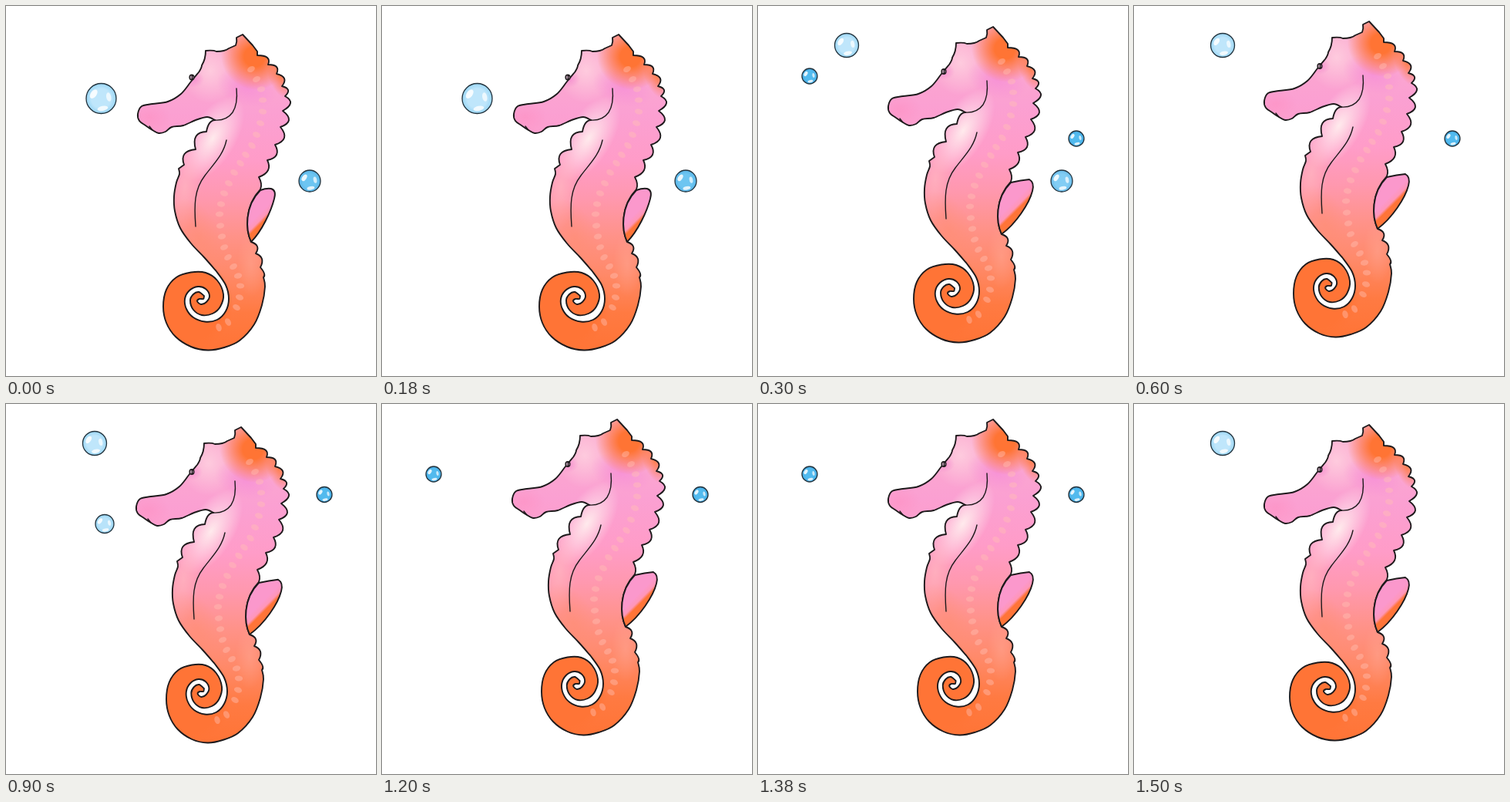
Write an HTML page with a canvas that moves like this. It is 480 px wide and 480 px high and loops after 1.8 s.

```html
<!DOCTYPE html>
<html>
<head>
<meta charset="utf-8">
<style>
  html, body { margin: 0; width: 100%; height: 100%; overflow: hidden; background: #fff; }
  canvas { display: block; }
</style>
</head>
<body>
<canvas id="stage" width="480" height="480"></canvas>
<script>
const ctx = document.getElementById('stage').getContext('2d');
const INK = '#1e1a1c', STEP = 300;

// bubbles: x, y, radius, paleness 0..1
const topLeft = [115, 51, 15.5, 0.8], sideLeft = [67, 91, 10, 0];
const sideRight = [394, 227, 14, 0.35], lowRight = [413, 172, 10, 0], highRight = [413, 117.5, 10, 0];
const rest = { dx: 0, dy: 0, curl: 0, fin: 0, eye: [241, 92.5] };
const pose = (dy, curl, fin) => ({ dx: -2, dy, curl, fin, eye: [243, 95] });
const low = pose(-10, 0, 10), high = pose(-17, 5, 10), mid = pose(-7, 6, 11);
const steps = [
  [rest, [[123.5, 120, 19.5, 0.8], [394, 227, 14, 0.2]]],
  [low, [topLeft, sideLeft, lowRight, sideRight]],
  [high, [topLeft, lowRight]],
  [mid, [topLeft, [128, 155.5, 12, 0.75], highRight]],
  [high, [sideLeft, highRight]],
  [low, [topLeft]]
];

const pairs = text => text.split(' ').map(p => p.split(',').map(Number));

// smooth line through the points, continuing from the first one
function smooth(pts) {
  let d = 'L' + pts[0];
  for (let i = 0; i < pts.length - 1; i++) {
    const a = pts[i - 1] || pts[i], b = pts[i], c = pts[i + 1], e = pts[i + 2] || c;
    d += `C${b.map((v, k) => v + (c[k] - a[k]) / 6)} ${c.map((v, k) => v - (e[k] - b[k]) / 6)} ${c}`;
  }
  return d;
}

// scallops: notch, tip, notch, tip, ... notch
function bumps(pts) {
  let d = 'L' + pts[0];
  for (let i = 0; i + 2 < pts.length; i += 2) {
    const [a, tip, b] = pts.slice(i, i + 3);
    d += `Q${tip.map((v, k) => 2 * v - (a[k] + b[k]) / 2)} ${b}`;
  }
  return d;
}

const back = pairs('326,64 339,67 340,76 351,79 351,88 361,94 358,104 366,109 362,117 369,126 359,136 367,148 356,157 361,171 349,180 351,193 339,200 340,213 328,222');
const lowerBack = pairs('318,306 326,312 324,321 332,328 330,339 335,347 334,352');
const tailOuter = pairs('334,352 336,364 332,388 322,413 303,434 283,443 262,446.5 240,442 220,429 208,411 204,390 208,368 221,352 240,345.5 259,346 274,356 282,374 278,390 268,399 254,401 243,394 239,382 243,374 250,371 257,376');
const tailInner = pairs('257,376 256,380 251,380 248,383 253,387 260,384 264,376 259,367 249,364 238,369 232,380 234,393 243,404 258,409.5 274,407 285,396 289,380 285,362 272,343');
const belly = pairs('272,343 257,326 240,308 226,288 219,266 218,247 221,229 225,218 224,211');
const front = pairs('231,206 231.5,192 246,186 246.5,169 260,163 264,152 271,148');
const snout = pairs('271,148 261,144 246,148 230,155 215,157 207,163 198,165 190,161 181,155 173,149 171,140 176,130 190,127 210,124 227,114 240,98 250,86');
const forehead = 'Q254 80 254 77Q259 69 259 58Q269 57 273 59Q284 59 289 55L298 51Q300 46 299 41L307 37L320 51L326 59Z';
const spots = pairs('318,82 325,95 331,108 333,122 333,137 330,152 325,167 319,181 311,193 304,204 296,216 289,230 283,243 279,257 277,270 278,285 280,299 283,313 288,326 295,338 301,350 304,363 303,378 299,391 288,410 276,417');
const lines = new Path2D('M271 148Q286 149 294 138Q301 127 299 107M286 174C282 193 270 204 258 220C244 238 244 258 246 286M190 161L186 156');

// narrows the coil towards its right side
const squeeze = (pts, k) => pts.map(([x, y]) => [y > 344 && x < 282 ? x + k * (282 - x) / 78 : x, y]);

function bodyPath(curl) {
  return new Path2D('M326 64' + bumps(back) + 'Q333 231 330 238C309 260 311 291 318 306' +
    bumps(lowerBack) + smooth(squeeze(tailOuter, curl)) + smooth(squeeze(tailInner, curl)) +
    smooth(belly) + bumps(front) + smooth(snout) + forehead);
}

function ramp(grad, stops) {
  stops.forEach(([at, color]) => grad.addColorStop(at, color));
  return grad;
}

// soft spot of colour; rgb as "r,g,b"
function glow(x, y, rx, ry, turn, rgb, alpha, core = 0) {
  ctx.save();
  ctx.translate(x, y);
  ctx.rotate(turn);
  ctx.scale(rx, ry);
  ctx.fillStyle = ramp(ctx.createRadialGradient(0, 0, core, 0, 0, 1),
    [[0, `rgba(${rgb},${alpha})`], [1, `rgba(${rgb},0)`]]);
  ctx.fillRect(-1, -1, 2, 2);
  ctx.restore();
}

function ellipse(x, y, rx, ry, turn, color) {
  ctx.beginPath();
  ctx.ellipse(x, y, rx, ry, turn, 0, 7);
  ctx.fillStyle = color;
  ctx.fill();
}

function shadeBody(body) {
  ctx.save();
  ctx.clip(body);
  ctx.fillStyle = ramp(ctx.createLinearGradient(0, 37, 0, 447), [
    [0, '#fbaecf'], [0.25, '#fba0d2'], [0.4, '#ff9cc8'], [0.52, '#ff98ae'],
    [0.64, '#ff9288'], [0.76, '#ff8968'], [0.88, '#ff7a42'], [1, '#ff7436']]);
  ctx.fillRect(160, 30, 220, 425);
  glow(265, 84, 38, 42, 0, '255,214,226', 0.75);
  glow(312, 106, 40, 24, 0.3, '246,140,216', 0.7);
  glow(322, 66, 44, 42, 0.7, '255,116,52', 1, 0.3);
  glow(356, 92, 15, 30, -0.4, '255,124,70', 0.9);
  glow(268, 172, 30, 62, 0.55, '255,238,238', 0.95);
  glow(232, 235, 22, 58, 0.1, '255,190,196', 0.55);
  glow(250, 300, 30, 55, -0.5, '255,140,112', 0.5);
  glow(318, 335, 18, 42, 0, '255,166,146', 0.5);
  glow(243, 95, 14, 11, 0, '242,128,204', 0.65);
  glow(186, 144, 28, 20, 0, '255,140,190', 0.45);
  glow(238, 388, 56, 62, 0, '255,116,54', 1, 0.75);
  spots.forEach(([x, y], i) => {
    const [nx, ny] = spots[i + 1] || [266, 420];
    ellipse(x, y, 3.6, 5.2, Math.atan2(ny - y, nx - x), 'rgba(255,190,180,.42)');
  });
  ctx.restore();
}

function drawFin(w) {
  const fin = new Path2D(`M330 239Q${338 + w / 2} 236 ${344 + w} ${237 - w / 5}Q${351 + w} 239 ${348 + w} 250C${344 + w} 266 ${332 + w / 2} 292 318 306C311 291 309 260 330 239Z`);
  ctx.fillStyle = ramp(ctx.createLinearGradient(319, 279, 331, 291),
    [[0, '#fb98cc'], [0.4, '#ff96b8'], [0.62, '#ff7438'], [1, '#ff7438']]);
  ctx.fill(fin);
  ctx.stroke(fin);
}

function drawSeahorse({ dx, dy, curl, fin, eye }) {
  const body = bodyPath(curl);
  ctx.save();
  ctx.translate(dx, dy);
  shadeBody(body);
  ctx.strokeStyle = INK;
  ctx.lineJoin = ctx.lineCap = 'round';
  ctx.lineWidth = 1.9;
  ctx.stroke(body);
  drawFin(fin);
  ctx.lineWidth = 1.4;
  ctx.stroke(lines);
  ellipse(...eye, 3.6, 4, 0, INK);
  ellipse(eye[0] - 1, eye[1], 1.2, 2.3, 0, '#a890a0');
  ellipse(eye[0] + 1.6, eye[1], 0.8, 1.8, 0, '#806878');
  ctx.restore();
}

function drawBubble([x, y, r, pale]) {
  const tint = (a, b) => a + (b - a) * pale;
  const fill = `rgb(${tint(82, 218)},${tint(186, 241)},${tint(238, 254)})`;
  const rim = `rgb(${tint(66, 176)},${tint(168, 226)},${tint(226, 250)})`;
  ellipse(x, y, r, r, 0, ramp(ctx.createRadialGradient(x, y, 0, x, y, r),
    [[0, fill], [0.65, fill], [1, rim]]));
  ellipse(x - r * 0.5, y - r * 0.3, r * 0.2, r * 0.34, 0.6, 'rgba(255,255,255,.85)');
  ellipse(x + r * 0.5, y - r * 0.1, r * 0.16, r * 0.3, -0.2, 'rgba(255,255,255,.7)');
  ellipse(x + r * 0.1, y + r * 0.66, r * 0.36, r * 0.16, -0.2, 'rgba(255,255,255,.8)');
  ctx.beginPath();
  ctx.arc(x, y, r, 0, 7);
  ctx.strokeStyle = '#22323c';
  ctx.lineWidth = 1.3;
  ctx.stroke();
}

function draw() {
  const [seahorse, bubbles] = steps[Math.floor(performance.now() / STEP) % steps.length];
  ctx.fillStyle = '#fff';
  ctx.fillRect(0, 0, 480, 480);
  bubbles.forEach(drawBubble);
  drawSeahorse(seahorse);
  requestAnimationFrame(draw);
}
draw();
</script>
</body>
</html>
```
